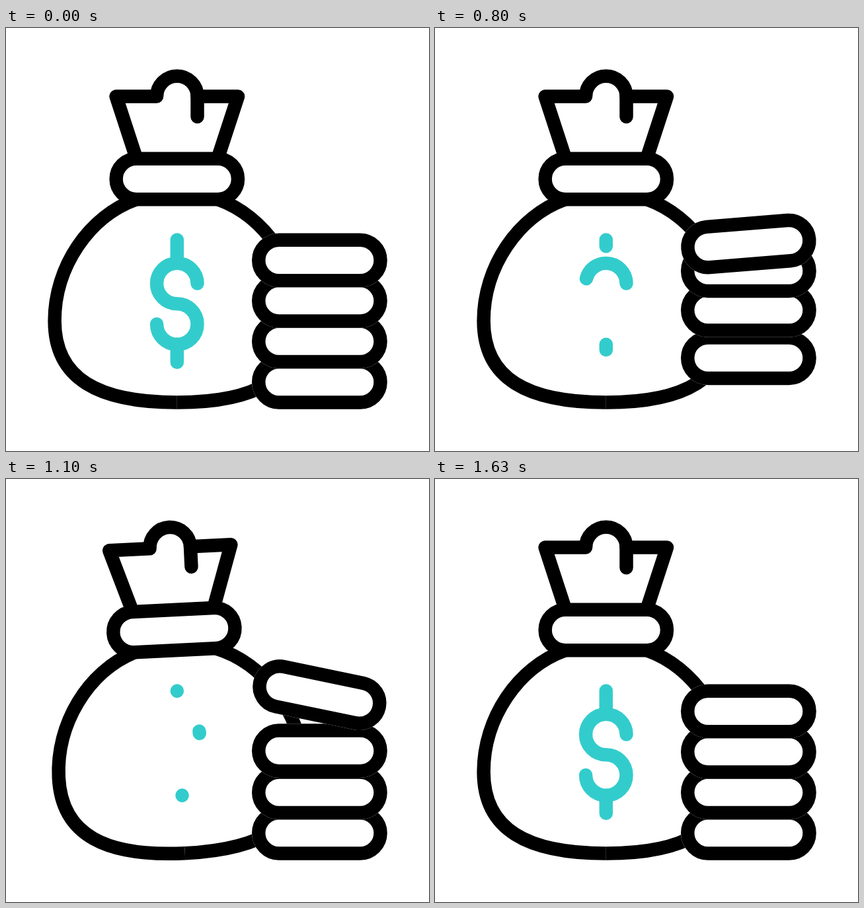
Recreate the animation shown at these times as an HTML page with a canvas. Size 640x640 px, loop 2500 ms.

```html
<!DOCTYPE html>
<html>
<head>
<meta charset="utf-8">
<title>Money bag and coins</title>
<style>
  html, body { margin: 0; width: 100%; height: 100%; overflow: hidden; background: #fff; }
  canvas { display: block; width: 640px; height: 640px; }
</style>
</head>
<body>
<canvas id="stage" width="640" height="640"></canvas>
<script>
const ctx = document.getElementById('stage').getContext('2d');
const LOOP = 2500, FPS = 30;
const R = 30.72, STROKE = 20.48;
const BAG_X = 258.8, COIN_X = 474.4, COIN_Y = 351.4, GAP = 61.44, LIFT = 49.1;
const TEAL = '#33cccc';

// Eased value from [frame, value] keys.
function track(f, keys) {
  if (f <= keys[0][0]) return keys[0][1];
  for (let i = 1; i < keys.length; i++) {
    const [a, from] = keys[i - 1], [b, to] = keys[i];
    if (f < b) {
      const u = (f - a) / (b - a);
      return from + (to - from) * u * u * (3 - 2 * u);
    }
  }
  return keys[keys.length - 1][1];
}

const clamp = v => Math.max(0, Math.min(1, v));
const rad = deg => deg * Math.PI / 180;

function stroke(color) {
  ctx.strokeStyle = color;
  ctx.stroke();
}

function line(...pts) {
  ctx.beginPath();
  for (let i = 0; i < pts.length; i += 2) ctx.lineTo(pts[i], pts[i + 1]);
}

function pill(x, y) {
  const h = 2 * R;
  ctx.beginPath();
  ctx.arc(x - h, y, R, Math.PI / 2, Math.PI * 1.5);
  ctx.arc(x + h, y, R, -Math.PI / 2, Math.PI / 2);
  ctx.closePath();
}

function coin(y, angle) {
  ctx.save();
  ctx.translate(COIN_X, y);
  ctx.rotate(rad(angle));
  pill(0, 0);
  ctx.fillStyle = '#fff';
  ctx.fill();
  stroke('#fff');
  stroke('#000');
  ctx.restore();
}

function dollar(k) {
  if (k <= 0) return;
  const x = BAG_X, top = 386.6, low = top + 2 * R, q = Math.PI / 2;
  line(x, 320.6, x, 320.6 + 31.4 * k);
  stroke(TEAL);
  line(x, low + R, x, low + R + 26.9 * k);
  stroke(TEAL);
  ctx.beginPath();
  ctx.arc(x, top, R, 0, -3 * q * Math.min(1, 2 * k), true);
  if (k > 0.5) ctx.arc(x, low, R, -q, -q + 3 * q * (2 * k - 1));
  stroke(TEAL);
}

function body() {
  const side = s => x => BAG_X + s * x;
  for (const at of [side(-1), side(1)]) {
    ctx.beginPath();
    ctx.moveTo(at(61.4), 259.2);
    ctx.bezierCurveTo(at(133.8), 285, at(185.2), 362, at(185.2), 443);
    ctx.bezierCurveTo(at(185.2), 531, at(118.8), 566.5, at(0), 566.5);
    ctx.lineCap = 'butt';
    stroke('#000');
  }
  ctx.lineCap = 'round';
}

function bag(angle, k) {
  const x = BAG_X, y = 103.5;
  ctx.save();
  ctx.translate(x, 320);
  ctx.rotate(rad(angle));
  ctx.translate(-x, -320);
  body();
  line(x - 61.4, 197.8, x - 92.2, y, x - R, y);
  ctx.arc(x, y, R, Math.PI, 0);
  ctx.lineTo(x + R, y + R);
  stroke('#000');
  line(x + R, y, x + 92.2, y, x + 61.4, 197.8);
  stroke('#000');
  pill(x, 228.5);
  ctx.fillStyle = '#fff';
  ctx.fill();
  stroke('#000');
  dollar(k);
  ctx.restore();
}

function draw(f) {
  ctx.fillStyle = '#fff';
  ctx.fillRect(0, 0, 640, 640);
  ctx.lineWidth = STROKE;
  ctx.lineCap = ctx.lineJoin = 'round';

  const sway = track(f, [[30, 0], [34, -3.3], [42, 3.45], [46, 0]]);
  const drawn = f < 30 ? 1 - clamp((f - 15) / 13) : clamp((f - 32.8) / 16.2);
  bag(sway, drawn);

  // Lower coins hop first, each one two frames after the one below.
  for (let i = 3; i > 0; i--) {
    const s = 15 + 2 * (3 - i);
    coin(COIN_Y + GAP * i - track(f, [[s, 0], [s + 6, LIFT], [s + 15, 0]]), 0);
  }
  const hop = track(f, [[21, 0], [27, 49.6], [30, 49.6], [36, 0]]);
  const tilt = track(f, [[21, 0], [28, -11.7], [33, 11.7], [37, 0]]);
  coin(COIN_Y - hop, tilt);
}

const start = performance.now();
function tick() {
  const t = (performance.now() - start) % LOOP;
  draw(Math.floor((t + 5) * FPS / 1000));
  requestAnimationFrame(tick);
}
tick();
</script>
</body>
</html>
```
